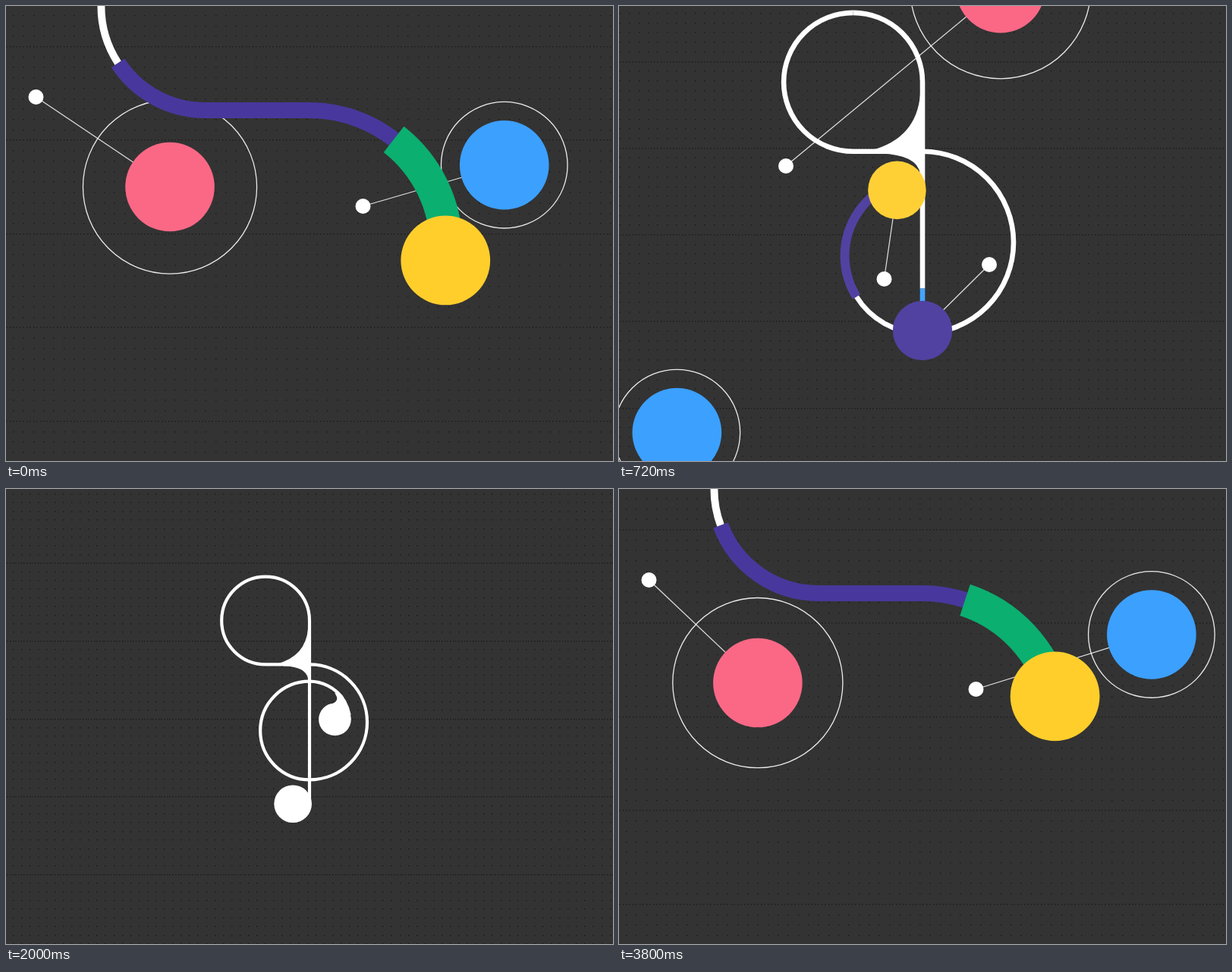
An HTML page with a canvas that plays this animation: 800x600 px, repeating every 3.84 s.

```html
<!DOCTYPE html>
<html lang="en">
<head>
<meta charset="utf-8">
<title>Clef</title>
<style>
html, body { margin: 0; width: 100%; height: 100%; overflow: hidden; background: #333; }
canvas { display: block; width: 800px; height: 600px; }
</style>
</head>
<body>
<canvas id="stage" width="800" height="600"></canvas>
<script>
const ctx = document.getElementById('stage').getContext('2d');
const LOOP = 3840, CUT = 3120, PI = Math.PI;
const WHITE = [255, 255, 255], PURPLE = [72, 56, 157], GREEN = [11, 175, 112],
      YELLOW = [255, 206, 43], PINK = [250, 104, 134], BLUE = [60, 160, 255];

const clamp = u => Math.min(1, Math.max(0, u));
const ease = (t, from, to) => {
  const u = clamp((t - from) / (to - from));
  return u * u * (3 - 2 * u);
};
const easeOut = (t, from, to, power) => 1 - (1 - clamp((t - from) / (to - from))) ** power;
const mix = (a, b, u) => a.map((v, i) => v + (b[i] - v) * u);
const rgb = c => `rgb(${c.map(Math.round)})`;

// Camera
const zoom = t => 2.355 - .856 * ease(t, 60, 970) - .52 * ease(t, 200, 2200) - .02 * ease(t, 2000, CUT);
const backZoom = t => 1 - .169 * easeOut(t, 280, 2030, 2);

// Curl: the ball speeds up until zero time, then coasts; trail ends lag behind
const curlHead = t => t < 0 ? 277 + .68 * t + .000364 * t * t : 277 + 394 * easeOut(t, 0, 2300, 3.65);
const greenLag = t => 77 * (1 - ease(t, 0, 760));
const purpleLag = t => 244 * (1 - ease(t, 140, 1260)) + .35 * Math.min(t, 0);
const curlInset = t => 28.5 * ease(t, 300, 1700);
const curlRadius = t => 25 - 3.5 * ease(t, 300, 1900);

// Stem ball
const stemHead = t => -220 + 341 * ease(t, -206, 970) - 5 * ease(t, 1360, 2000);
const stemShift = t => -22 * ease(t, 720, 2000);

// Planets, with time counted from their first full view
const pinkAt = t => [182 + .853 * t - .000567 * t * t, 256 - .429 * t + .0000816 * t * t];
const pinkRing = t => Math.max(0, 119 - 7 * Math.exp(-t / 90));
const blueAt = t => [703 - 645 * Math.sin(.00175 * t), 191.5 + .442 * t + .00006 * t * t];

// Clef geometry around the stage centre at zoom 1
const LOOP_R = 58.3, BOW_R = 76.5, CURL_R = 65.3, HOOK_R = 54;
const LINE_Y = -69, LOOP_Y = LINE_Y - LOOP_R, BOW_Y = LINE_Y + BOW_R, CURL_Y = BOW_Y + BOW_R - CURL_R;
const QUARTER = LOOP_R * PI / 2, BOW_AT = QUARTER + LOOP_R, CURL_AT = BOW_AT + BOW_R * PI;
const HOOK_ANGLE = .95, CURL_END = CURL_AT + CURL_R * PI + HOOK_R * HOOK_ANGLE;

const curlPath = new Path2D();
curlPath.arc(-LOOP_R, LOOP_Y, LOOP_R, -PI / 2, -1.5 * PI, true);
curlPath.lineTo(0, LINE_Y);
curlPath.arc(0, BOW_Y, BOW_R, -PI / 2, PI / 2);
curlPath.arc(0, CURL_Y, CURL_R, PI / 2, 1.5 * PI);
curlPath.arc(0, CURL_Y - CURL_R + HOOK_R, HOOK_R, -PI / 2, HOOK_ANGLE - PI / 2);

const stemPath = new Path2D();
stemPath.arc(-LOOP_R, LOOP_Y, LOOP_R, -PI / 2, 0);
stemPath.lineTo(0, 140);

const web = new Path2D('M-43 -70Q-5 -80 -1.9 -117L1.6 -117V-50H-2Q-4 -66 -35 -67.2Z');
const tail = new Path2D('M37 -35Q50 -24 54.4 -3L33 3L23 -16Q38 -19 35.5 -27L33 -32Z');

function polar(x, y, r, a) {
  return [x + r * Math.cos(a), y + r * Math.sin(a)];
}

function curlPoint(s, inset) {
  if (s < QUARTER) return polar(-LOOP_R, LOOP_Y, LOOP_R, PI - s / LOOP_R);
  if (s < BOW_AT) return [s - BOW_AT, LINE_Y];
  if (s < CURL_AT) return polar(0, BOW_Y, BOW_R - inset, (s - BOW_AT) / BOW_R - PI / 2);
  return polar(0, CURL_Y, CURL_R - inset, (s - CURL_AT) / CURL_R + PI / 2);
}

function stemPoint(u) {
  return u > LOOP_Y ? [0, u] : polar(-LOOP_R, LOOP_Y, LOOP_R, (u - LOOP_Y) / LOOP_R);
}

function disc([x, y], r, color) {
  ctx.fillStyle = rgb(color);
  ctx.beginPath();
  ctx.arc(x, y, r, 0, 2 * PI);
  ctx.fill();
}

function ring([x, y], r) {
  ctx.strokeStyle = 'rgba(255,255,255,.9)';
  ctx.lineWidth = 1.3;
  ctx.beginPath();
  ctx.arc(x, y, r, 0, 2 * PI);
  ctx.stroke();
}

// Strokes the part of a path between two distances
function section(path, from, to, width, color) {
  if (to <= from) return;
  ctx.setLineDash([to - from, 9999]);
  ctx.lineDashOffset = -from;
  ctx.lineWidth = width;
  ctx.strokeStyle = rgb(color);
  ctx.stroke(path);
  ctx.setLineDash([]);
}

function tether(t, start, end, dot, target) {
  const grow = ease(t, start, start + 80) * (1 - ease(t, end - 80, end));
  if (!grow) return;
  ctx.strokeStyle = 'rgba(255,255,255,.85)';
  ctx.lineWidth = 1.2;
  ctx.beginPath();
  ctx.moveTo(...dot);
  ctx.lineTo(...mix(dot, target, grow));
  ctx.stroke();
  disc(dot, 10 * grow, WHITE);
}

// Fills a shape scaled about a pivot that is moved to a given place
function grown(shape, [px, py], place, size) {
  if (!size) return;
  ctx.save();
  ctx.translate(...place);
  ctx.scale(size, size);
  ctx.translate(-px, -py);
  ctx.fillStyle = '#fff';
  ctx.fill(shape);
  ctx.restore();
}

function backdrop(t) {
  const z = backZoom(t), pitch = 13.34;
  ctx.fillStyle = '#333';
  ctx.fillRect(0, 0, 800, 600);
  ctx.fillStyle = '#1a1a1a';
  for (let row = -8; row < 56; row++) {
    const y = 315 + (53 + row * 13.72 - 315) * z;
    const step = row % 9 ? pitch : pitch / 3;
    for (let x = 9 - pitch * 8; x < 910; x += step)
      ctx.fillRect(Math.round(400 + (x - 400) * z), Math.round(y), 1.4, 1.4);
  }
}

function planets(t, curl, stem) {
  const pink = pinkAt(t + 40), blue = blueAt(t + 40);
  tether(t, -200, 900, mix([39.5, 120], [220, 211], ease(t, 110, 190)), pink);
  tether(t, -220, 600, mix([470.5, 264], [459.5, 462], ease(t, 110, 190)), blue);
  tether(t, 160, 1080, mix([488, 260], [488, 341], ease(t, 400, 600)), stem);
  tether(t, 520, 1080, [349.5, 360], curl);
  ring(pink, pinkRing(t + 40));
  ring(blue, 83.3);
  disc(pink, 58.8, PINK);
  disc(blue, 58.8, BLUE);
}

function clef(t, curl, stem) {
  const pale = ease(t, 640, 1240), tint = c => mix(c, WHITE, pale);
  const head = Math.min(curlHead(t), CURL_END) + QUARTER;
  const purple = head - purpleLag(t), green = head - greenLag(t);
  const drop = stemHead(t) - LOOP_Y + QUARTER, blue = drop - 35.5;

  section(curlPath, 0, purple, 4.2, WHITE);
  section(stemPath, 0, blue, 4.2, WHITE);
  section(curlPath, purple, head, 8.9 - 4.7 * ease(t, 450, 1240), tint(PURPLE));
  section(curlPath, green, head, 18.4, GREEN);
  section(stemPath, blue, drop, 4.2, tint(BLUE));

  const swell = ease(t, 1450, 1980);
  grown(web, [0, LINE_Y], [0, LINE_Y], ease(t, 340, 680));
  grown(tail, [33, 3], curl, swell && .4 + .6 * swell);
  disc(curl, curlRadius(t), tint(YELLOW));
  disc(stem, 25, tint(PURPLE));
}

function draw(t) {
  const k = zoom(t), toStage = ([x, y]) => [400 + x * k, 300 + y * k];
  const curl = curlPoint(curlHead(t), curlInset(t));
  const [x, y] = stemPoint(stemHead(t)), stem = [x + stemShift(t), y];

  backdrop(t);
  if (t < 1200) planets(t, toStage(curl), toStage(stem));
  ctx.save();
  ctx.translate(400, 300);
  ctx.scale(k, k);
  clef(t, curl, stem);
  ctx.restore();
}

const began = performance.now();
function frame() {
  const t = (performance.now() - began) % LOOP;
  draw(t < CUT ? t : t - LOOP);
  requestAnimationFrame(frame);
}
frame();
</script>
</body>
</html>
```
